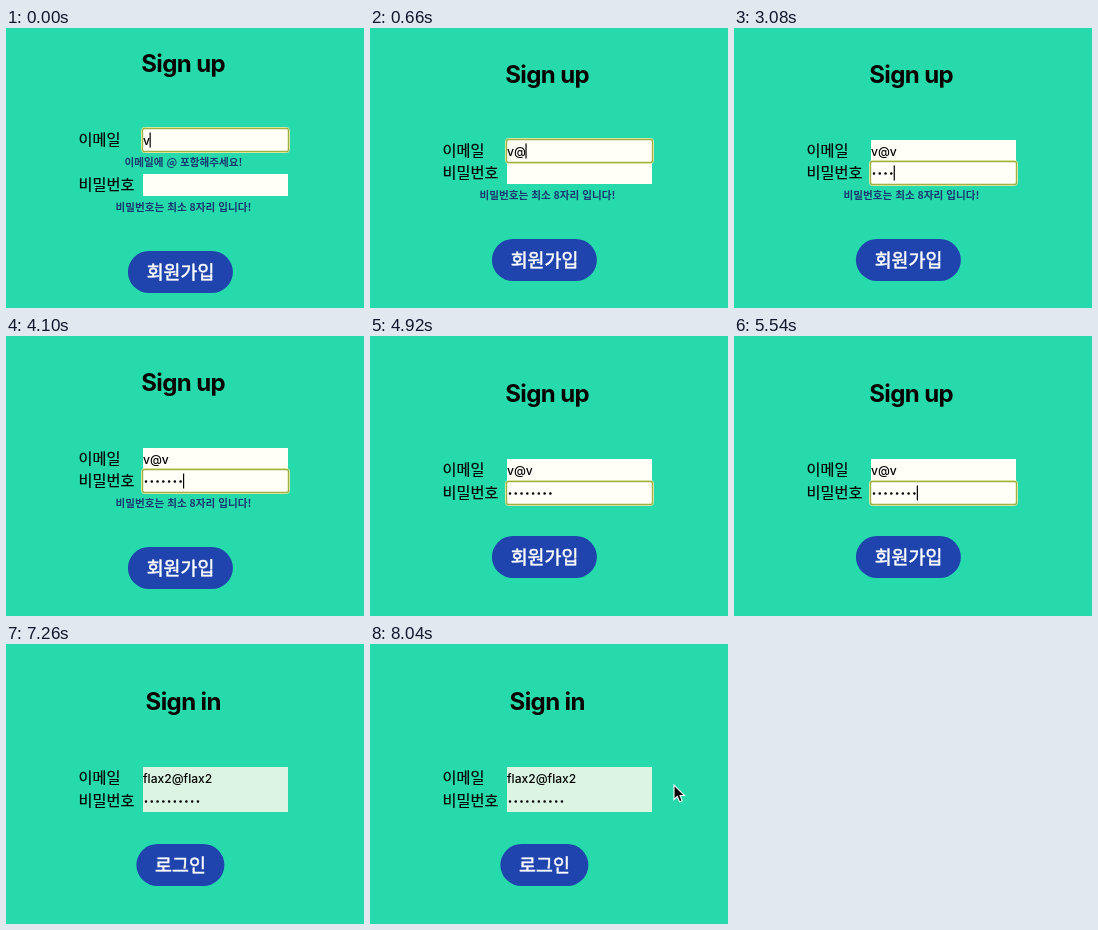
An HTML page for the animation above (8.06 s loop, 358 by 280 pixels).

```html
<!DOCTYPE html>
<html lang="ko">
<head>
<meta charset="utf-8">
<style>
html, body { margin: 0; height: 100%; overflow: hidden; background: #26daac; }
svg { display: block; width: 100vw; height: 100vh; }
text { font-family: Inter, "Noto Sans CJK KR", "Noto Sans CJK", sans-serif; white-space: pre; }
.ko { font-family: "Noto Sans CJK KR", "Noto Sans CJK", "Noto Sans CJK JP", sans-serif; }
.mid { text-anchor: middle; }
.box { shape-rendering: crispEdges; }
#title { font-size: 24px; font-weight: 700; letter-spacing: -.6px; }
.label { font-size: 15.2px; stroke: #000; stroke-width: .2; }
.value { font-size: 12.1px; font-weight: 500; }
.note { font-size: 10.6px; font-weight: 700; fill: #173a70; }
#action { font-size: 18.4px; fill: #fff; stroke: #fff; stroke-width: .5; }
#dots { stroke: #000; stroke-width: 2.6; stroke-linecap: round; stroke-dasharray: 0 5.77; }
</style>
</head>
<body>
<svg viewBox="0 0 358 280">
  <text id="title" class="mid" x="177.2"></text>
  <g id="email">
    <text class="label ko" x="72.5" y="5">이메일</text>
    <rect class="box" x="137" y="-11" width="145" height="23"/>
    <text id="address" class="value" x="137" y="4.5"></text>
  </g>
  <text id="emailNote" class="note ko mid" x="177.5">이메일에 @ 포함해주세요!</text>
  <g id="password">
    <text class="label ko" x="72.5" y="5">비밀번호</text>
    <rect class="box" x="137" y="-11" width="145" height="22"/>
    <path id="dots"/>
  </g>
  <text id="passNote" class="note ko mid" x="177.5">비밀번호는 최소 8자리 입니다!</text>
  <g id="focus" fill="none">
    <rect x="135.5" y="-12.5" width="148" height="25" rx="3" stroke="#eef5b4"/>
    <rect x="136.5" y="-11.5" width="146" height="23" rx="2" stroke="#9fb144" stroke-width="1.4"/>
    <path id="caret" d="M0-7.5V7.5" stroke="#000" stroke-width="1.2"/>
  </g>
  <rect id="button" height="42" rx="21"/>
  <text id="action" class="ko mid" x="174.5"></text>
  <path id="pointer" d="M0 0V14.5L3.3 11.5L5.6 16.8L8.2 15.7L6 10.5H10.5Z" stroke="#fff" stroke-width="1.1"/>
</svg>
<script>
const LOOP = 8060, FOCUS_PASS = 1200, BLUR = 6050, SIGN_IN = 6400, FILLED = 6540;
const emailKeys = [0, 400, 760];
const passKeys = [1700, 2100, 2500, 2900, 3300, 3700, 4000, 4300];
const DOT = 5.77;
// Pointer trips: [time, x, y]
const trips = [
  [[5780, 196, 216], [6120, 198, 214], [6320, 207, 193], [6560, 268, 168], [6760, 328, 152]],
  [[7640, 357, 150], [7860, 322, 144], [8000, 304, 141], [8060, 304, 141]]
];
const $ = id => document.getElementById(id);
const set = (id, attrs) => { for (const k in attrs) $(id).setAttribute(k, attrs[k]); };
const show = (id, on) => set(id, { visibility: on ? 'visible' : 'hidden' });
const moveTo = (id, x, y) => set(id, { transform: `translate(${x} ${y})` });
const typed = (keys, t) => keys.filter(k => k <= t).length;

function pointerAt(t) {
  for (const trip of trips)
    for (let i = 1; i < trip.length; i++) {
      const [t0, x0, y0] = trip[i - 1], [t1, x1, y1] = trip[i];
      if (t >= t0 && t < t1) {
        const p = (t - t0) / (t1 - t0);
        return [x0 + (x1 - x0) * p, y0 + (y1 - y0) * p];
      }
    }
}

function draw(t) {
  const signIn = t >= SIGN_IN, filled = t >= FILLED;
  const address = signIn ? (filled ? 'flax2@flax2' : '') : 'v@v'.slice(0, typed(emailKeys, t));
  const dots = signIn ? (filled ? 10 : 0) : typed(passKeys, t);
  const badEmail = !address.includes('@'), badPass = dots < 8;

  // Rows are stacked and the whole form stays vertically centred.
  const top = 58.2 - 11.25 * (badEmail + badPass);
  const emailY = Math.round(top + 76);
  const passY = Math.round(top + (badEmail ? 121 : 98.5));
  const buttonY = Math.round(top + 98.5 + (badEmail + badPass) * 22.5 + 43.5);

  $('title').textContent = signIn ? 'Sign in' : 'Sign up';
  set('title', { y: Math.round(top + 8) });
  $('address').textContent = address;
  moveTo('email', 0, emailY);
  moveTo('password', 0, passY);
  set('emailNote', { y: emailY + 26 });
  set('passNote', { y: passY + 26 });
  show('emailNote', badEmail);
  show('passNote', badPass);
  set('dots', { d: dots ? `M140 .5h${(dots - 1) * DOT + .1}` : '' });
  for (const box of document.querySelectorAll('.box'))
    box.setAttribute('fill', filled ? '#dcf5e2' : '#fffff8');

  const onPass = t >= FOCUS_PASS;
  const last = Math.max(...[...emailKeys, FOCUS_PASS, ...passKeys].filter(k => k <= t));
  show('focus', t < BLUR);
  moveTo('focus', 0, onPass ? passY : emailY);
  const caretX = 137.2 + (onPass ? dots * DOT : $('address').getComputedTextLength());
  moveTo('caret', caretX, 0);
  set('caret', { opacity: (t - last) % 1000 < 500 ? 1 : 0 });

  const width = signIn ? 88 : 105;
  const pos = pointerAt(t);
  set('button', { x: 174.4 - width / 2, y: buttonY, width, fill: pos && !signIn ? '#1c3a80' : '#2044ae' });
  $('action').textContent = signIn ? '로그인' : '회원가입';
  set('action', { y: buttonY + 27.5 });
  show('pointer', pos);
  if (pos) moveTo('pointer', ...pos);
}

const start = performance.now();
function tick() {
  draw((performance.now() - start) % LOOP);
  requestAnimationFrame(tick);
}
tick();
</script>
</body>
</html>
```
